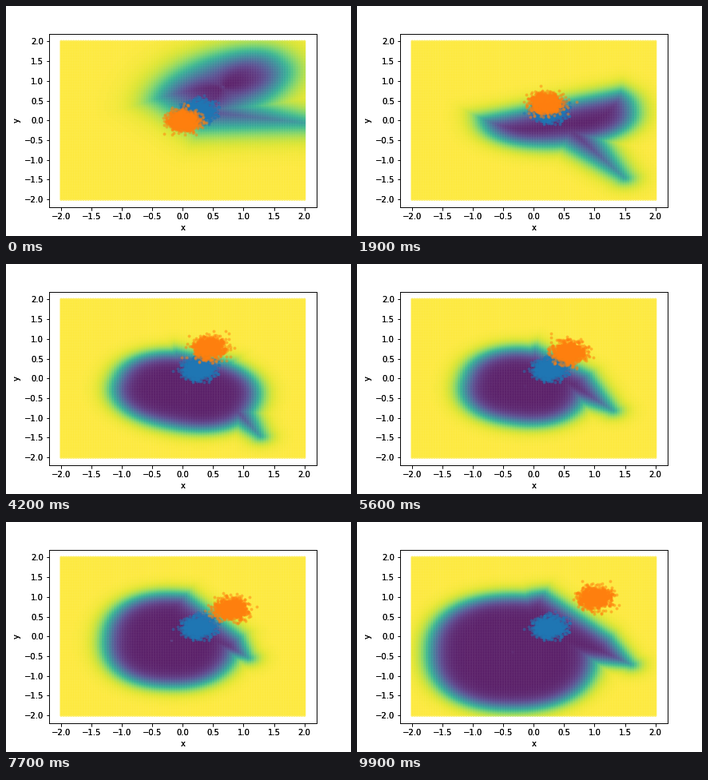
Write a matplotlib script that moves like this. It is 432 by 288 pixels and loops after 10 s.

```python
import numpy as np
import matplotlib.pyplot as plt
from matplotlib.animation import FuncAnimation

FRAMES = 100
REAL = np.array([.25, .25])


def path(frame, *keys):
    """Piecewise linear motion through (frame, value...) keys."""
    t, *values = zip(*keys)
    return np.array([np.interp(frame, t, v) for v in values])


def fake_mean(frame):
    y = path(frame, (0, 0), (10, -.01), (28, .89), (56, .67),
             (68, .89), (85, .53), (99, .98))
    return np.array([frame / 98, y[0]])


def ellipse(points, center, size, tilt):
    """Radial distance to a slightly squared, tilted ellipse."""
    x, y = (points - center).T
    c, s = np.cos(tilt), np.sin(tilt)
    u, v = (c * x + s * y) / size[0], (c * y - s * x) / size[1]
    rho = (np.abs(u) ** 2.3 + np.abs(v) ** 2.3) ** (1 / 2.3)
    return np.hypot(x, y) * (1 - 1 / np.maximum(rho, .05))


def spike(points, base, tip, width):
    """Distance to a wedge that narrows from base to tip."""
    axis, d = tip - base, points - base
    h = np.clip(d @ axis / (axis @ axis), 0, 1)
    return np.hypot(*(d - h[:, None] * axis).T) - width * (1 - h)


def score(frame, points):
    """Discriminator output: low around real data, cut off towards the fake."""
    center = path(frame, (0, .65, .85), (10, .55, .8), (28, .25, -.45),
                  (56, -.15, -.2), (85, -.2, -.05), (99, -.35, -.4))
    size = path(frame, (0, 1.1, .62), (10, 1.1, .62), (28, 1.35, .9),
                (56, 1, .92), (68, 1.15, 1.1), (85, 1, 1.2), (99, 1.35, 1.42))
    tip = path(frame, (0, 2, -.05), (28, 1.25, -2.1), (56, 1.3, -.8),
               (68, 1.5, -.9), (85, .7, -.2), (99, 1.6, -.7))
    tilt = path(frame, (0, .6), (10, .6), (28, -.4), (85, 0))[0]
    sharp = path(frame, (0, 5), (28, 10))[0]

    mean = fake_mean(frame)
    away = mean - REAL
    cut = (points - (mean + REAL) / 2) @ away / np.hypot(*away)
    body = np.minimum(ellipse(points, center, size, tilt),
                      spike(points, REAL, tip, .6 * size[1]))
    return 1 / (1 + np.exp(-sharp * np.maximum(body, cut)))


def cloud(seed, mean):
    return np.random.default_rng(seed).normal(mean, .125, (1000, 2))


def add_axes(**style):
    ax = fig.add_axes([.125, .125, .775, .755], **style)
    ticks = np.arange(-2, 2.1, .5)
    ax.set(xlim=(-2.2, 2.2), ylim=(-2.2, 2.2), xlabel="x", ylabel="y",
           xticks=ticks, yticks=ticks)
    return ax


steps = np.linspace(-2, 2, 100)
grid = np.stack(np.meshgrid(steps, steps), -1).reshape(-1, 2)

fig = plt.figure(figsize=(6, 4), dpi=72)
ax = add_axes()
add_axes(facecolor="none", label="ink")  # second pass darkens the lettering
field = ax.scatter(*grid.T, c=np.zeros(len(grid)), s=14, alpha=.7,
                   linewidths=0, vmin=0, vmax=1, cmap="viridis")
dots = dict(s=15, alpha=.5, linewidths=0)
ax.scatter(*cloud(7, REAL).T, color="C0", **dots)
fake = ax.scatter([], [], color="C1", **dots)


def update(frame):
    field.set_array(score(frame, grid))
    fake.set_offsets(cloud(100 + frame, fake_mean(frame)))
    return field, fake


anim = FuncAnimation(fig, update, frames=FRAMES, interval=100,
                     repeat=True, repeat_delay=0)
plt.show()
```
